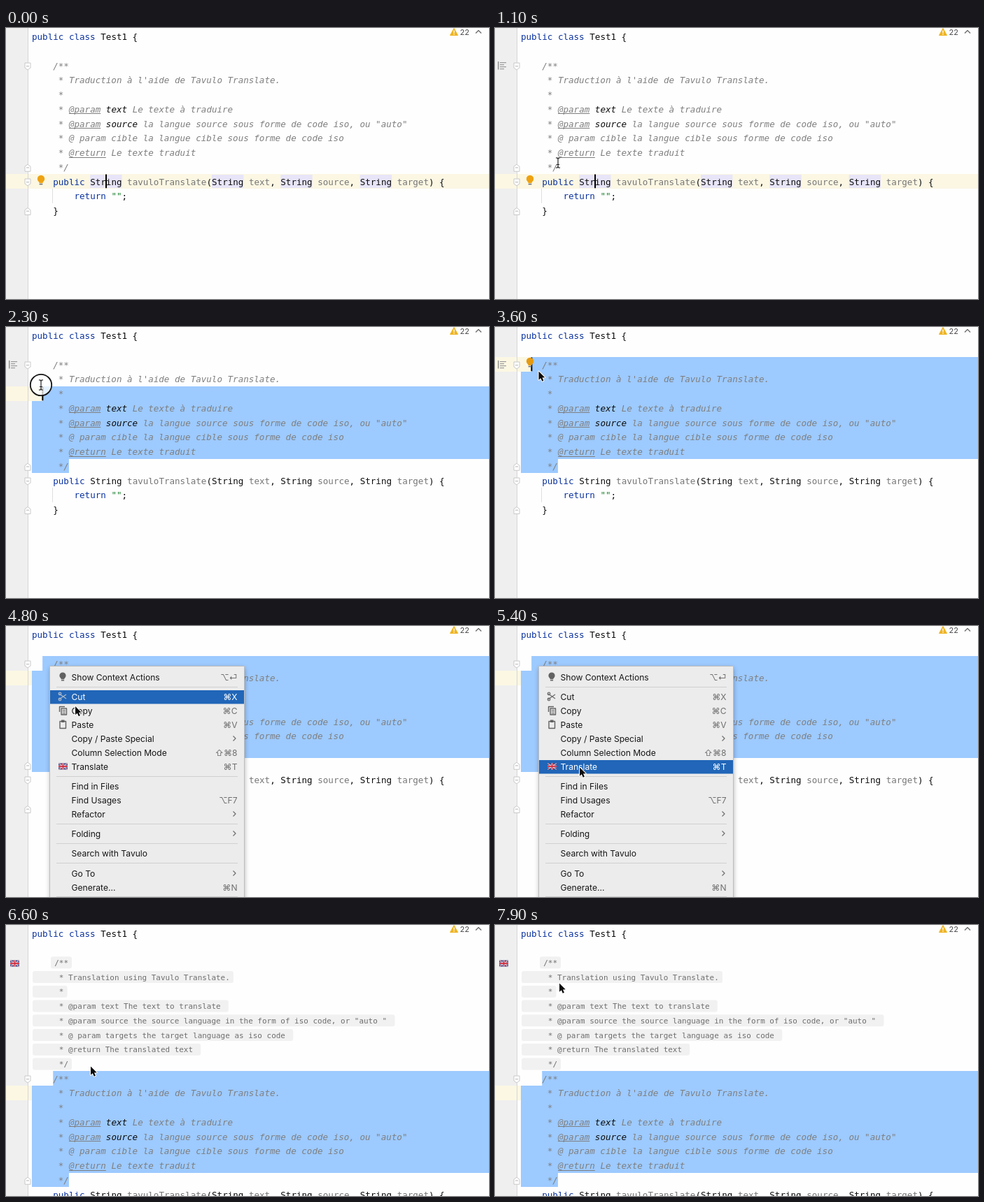
Animation, 690 px wide and 388 px high, one loop 8000 ms. Source, as an HTML page with a canvas:

```html
<!DOCTYPE html>
<html lang="fr">
<head>
<meta charset="utf-8">
<title>Editor translation</title>
<style>
html, body { margin: 0; width: 100%; height: 100%; overflow: hidden; background: #fefefe; }
canvas { display: block; width: 690px; height: 388px; }
</style>
</head>
<body>
<canvas id="stage"></canvas>
<script>
const W = 690, H = 388, LOOP = 8000, PITCH = 7.56, ROW = 20.75, LEFT = 37;
const MONO = '"DejaVu Sans Mono", "Noto Sans Mono", monospace';
const SANS = 'Inter, "DejaVu Sans", sans-serif';
const CODE = '12.557px ' + MONO, INLAY = '10.96px ' + MONO, MENU = '12.1px ' + SANS;
const GRAY = '#7f7f7f', UNUSED = '#767676', INK = '#0c0c0c', KEY = '#0a319f';
const BLUE = '#9dcaff', YELLOW = '#fbf7e3';

const canvas = document.getElementById('stage');
const ctx = canvas.getContext('2d');
const dpr = window.devicePixelRatio || 1;
canvas.width = W * dpr;
canvas.height = H * dpr;

const colX = c => LEFT + c * PITCH;
const rowMid = r => 12.7 + r * ROW;
const rowTop = r => Math.round(rowMid(r) - ROW / 2 - 0.5);

function rect(x, y, w, h, fill) {
  ctx.fillStyle = fill;
  ctx.fillRect(x, y, w, h);
}

function round(x, y, w, h, r, fill) {
  ctx.beginPath();
  ctx.roundRect(x, y, w, h, r);
  ctx.fillStyle = fill;
  ctx.fill();
}

function disc(x, y, r, fill) {
  ctx.beginPath();
  ctx.arc(x, y, r, 0, 7);
  ctx.fillStyle = fill;
  ctx.fill();
}

function trace(points, close) {
  ctx.beginPath();
  for (let i = 0; i < points.length; i += 2) ctx.lineTo(points[i], points[i + 1]);
  if (close) ctx.closePath();
}

function line(points, color, width = 1, close = false) {
  trace(points, close);
  ctx.strokeStyle = color;
  ctx.lineWidth = width;
  ctx.stroke();
}

function text(s, x, y, font, color, align = 'left') {
  ctx.font = font;
  ctx.fillStyle = color;
  ctx.textAlign = align;
  ctx.fillText(s, x, y);
}

// Each piece is a style letter followed by its text.
const STYLES = {
  k: ['', KEY], b: ['', INK], u: ['', UNUSED], s: ['', '#16802a'],
  c: ['italic ', GRAY], t: ['italic ', GRAY], p: ['italic ', INK]
};
function codeLine(row, col, pieces) {
  const y = rowMid(row) + 4.4;
  for (const piece of pieces) {
    const s = piece.slice(1), [slant, color] = STYLES[piece[0]];
    text(s, colX(col), y, slant + CODE, color);
    if (piece[0] === 't') rect(colX(col), Math.round(y + 1.5), s.length * PITCH, 1, GRAY);
    col += s.length;
  }
}

const DOC = [
  ['c/**'],
  ["c * Traduction à l'aide de Tavulo Translate."],
  ['c *'],
  ['c * ', 't@param', 'p text', 'c Le texte à traduire'],
  ['c * ', 't@param', 'p source', 'c la langue source sous forme de code iso, ou "auto"'],
  ['c * @ param cible la langue cible sous forme de code iso'],
  ['c * ', 't@return', 'c Le texte traduit'],
  ['c */']
].map(pieces => pieces.map((p, i) => i && pieces[i - 1][0] === 't' ? p[0] + ' ' + p.slice(1).trim() : p));
const ENGLISH = [
  '/**', '* Translation using Tavulo Translate.', '*',
  '* @param text The text to translate',
  '* @param source the source language in the form of iso code, or "auto "',
  '* @ param targets the target language as iso code',
  '* @return The translated text', '*/'
];

function drawCode(shift) {
  codeLine(0, 0, ['kpublic class ', 'bTest1 {']);
  DOC.forEach((d, i) => codeLine(2 + i + shift, 4, d));
  codeLine(10 + shift, 4, ['kpublic ', 'bString ', 'utavuloTranslate', 'b(String ', 'utext',
    'b, String ', 'usource', 'b, String ', 'utarget', 'b) {']);
  if (shift) return;
  rect(66, rowTop(11), 1, ROW, '#dedede');
  codeLine(11, 8, ['kreturn ', 's""', 'b;']);
  codeLine(12, 4, ['b}']);
}

function drawInlay() {
  ENGLISH.forEach((s, i) => {
    const y = rowMid(2 + i), x = i ? 75.8 : 69.2, left = i ? 38 : 64;
    const end = x + s.length * 6.6 + (s.includes('@') ? 11 : 5);
    round(left, y - 9, end - left, 17, 3, '#f1f1f1');
    text(s, x, y + 3.6, INLAY, '#6e6e6e');
  });
}

function drawFold(row, up) {
  const y = rowMid(row) + 0.8, d = up ? -1 : 1;
  const shape = [27, y - 5 * d, 35, y - 5 * d, 35, y + 2 * d, 31, y + 5 * d, 27, y + 2 * d];
  trace(shape, true);
  ctx.fillStyle = '#fff';
  ctx.fill();
  line(shape, '#c8c8c8', 1, true);
  rect(29, y - 0.8, 4, 1, '#b4b4b4');
}

function drawBulb(x, y, color, r) {
  disc(x, y, r, color);
  rect(x - r * 0.5, y + r * 0.7, r, r * 0.45, color);
  rect(x - r * 0.45, y + r * 1.3, r * 0.9, 1.6, '#6e6e6e');
}

function drawFlag(x, y) {
  ctx.save();
  ctx.beginPath();
  ctx.rect(x - 6.5, y - 4.5, 13, 9);
  ctx.clip();
  rect(x - 7, y - 5, 14, 10, '#22377f');
  for (const [color, wide] of [['#e8e8f0', 1.5], ['#cf2a3c', 0.6]]) {
    line([x - 7, y - 5, x + 7, y + 5], color, wide);
    line([x - 7, y + 5, x + 7, y - 5], color, wide);
  }
  rect(x - 1.5, y - 5, 3, 10, '#f4f4f8');
  rect(x - 7, y - 1.5, 14, 3, '#f4f4f8');
  rect(x - 0.9, y - 5, 1.8, 10, '#cf2a3c');
  rect(x - 7, y - 0.9, 14, 1.8, '#cf2a3c');
  ctx.restore();
}

function drawStatus() {
  trace([640, 0.5, 645.5, 10.5, 634.5, 10.5], true);
  ctx.fillStyle = ctx.strokeStyle = '#eeb422';
  ctx.lineJoin = 'round';
  ctx.lineWidth = 1;
  ctx.fill();
  ctx.stroke();
  rect(639.3, 3.5, 1.4, 3.8, '#fff');
  rect(639.3, 8.2, 1.4, 1.4, '#fff');
  text('22', 648.5, 9.8, '11px ' + SANS, '#4a4a4a');
  line([671, 7.5, 675, 3.5, 679, 7.5], '#6a6a6a', 1.3);
}

const ITEMS = [
  [73, 'Show Context Actions', '⌥⏎'],
  [101, 'Cut', '⌘X'], [121, 'Copy', '⌘C'], [141, 'Paste', '⌘V'],
  [161, 'Copy / Paste Special', '>'], [181, 'Column Selection Mode', '⇧⌘8'], [201, 'Translate', '⌘T'],
  [229, 'Find in Files', ''], [249, 'Find Usages', '⌥F7'], [269, 'Refactor', '>'],
  [297, 'Folding', '>'], [325.5, 'Search with Tavulo', ''],
  [354, 'Go To', '>'], [374, 'Generate...', '⌘N']
];

function drawMenuIcons(cutColor) {
  const c = '#626262';
  drawBulb(81, 71, c, 4.6);
  line([76, 97, 86, 104], cutColor, 1.3);
  line([76, 105, 86, 98], cutColor, 1.3);
  for (const y of [97, 105]) {
    ctx.beginPath();
    ctx.arc(77, y, 1.8, 0, 7);
    ctx.stroke();
  }
  line([76.5, 123, 76.5, 115.5, 84, 115.5], c, 1.4);
  line([79, 118, 86.5, 118, 86.5, 127, 79, 127], c, 1.4, true);
  rect(80.5, 120, 4.5, 1, c);
  rect(80.5, 122.3, 4.5, 1, c);
  rect(80.5, 124.6, 4.5, 1, c);
  line([77, 136.5, 85.5, 136.5, 85.5, 146.5, 77, 146.5], c, 1.4, true);
  rect(79, 134.5, 4.5, 3.5, c);
  drawFlag(81.5, 201);
}

function drawMenu(alpha, hot) {
  ctx.save();
  ctx.globalAlpha = alpha;
  ctx.shadowColor = 'rgba(0,0,0,.35)';
  ctx.shadowBlur = 7 * dpr;
  ctx.shadowOffsetY = 2 * dpr;
  rect(62.5, 57.5, 278, 345, '#ececec');
  ctx.shadowColor = 'transparent';
  line([62.5, 57.5, 340.5, 57.5, 340.5, 400, 62.5, 400], '#bdbdbd', 1, true);
  for (const y of [87, 215, 283, 311, 339.5, 387.5]) rect(72, Math.floor(y), 259, 1, '#d0d0d0');
  for (const [y, label, hint] of ITEMS) {
    const on = hot === label, tint = on ? '#fff' : '#6f6f6f';
    if (on) rect(63, y - 9, 277, 19.5, '#2166b8');
    text(label, 93.5, y + 4.6, MENU, on ? '#fff' : '#161616');
    if (hint === '>') line([324.5, y - 3.5, 328, y, 324.5, y + 3.5], tint, 1.2);
    else text(hint, 330.5, y + 4.6, MENU, tint, 'right');
  }
  drawMenuIcons(hot === 'Cut' ? '#a9b8ca' : '#6e6e6e');
  ctx.restore();
}

// Pointer stops: time, x, y.
const PATH = [
  [200, 265, 252], [600, 170, 203], [1000, 90, 193], [1100, 90, 193], [1300, 89, 200],
  [1400, 88, 199], [1700, 51, 157], [1800, 51, 157], [1900, 50, 135], [2500, 50, 57],
  [2700, 50, 56], [3000, 62.5, 63.5], [4700, 62.5, 63.5], [4800, 99, 115], [5000, 106, 142],
  [5400, 121, 202.5], [7500, 121, 202.5], [7600, 108, 234], [7700, 64, 196],
  [7800, 74, 122], [7900, 92, 83.5]
];
function pointer(t) {
  const i = PATH.findIndex(p => p[0] > t);
  if (i === 0) return PATH[0].slice(1);
  if (i < 0) return PATH[PATH.length - 1].slice(1);
  const a = PATH[i - 1], b = PATH[i], k = (t - a[0]) / (b[0] - a[0]);
  return [a[1] + (b[1] - a[1]) * k, a[2] + (b[2] - a[2]) * k];
}

function drawArrow(x, y) {
  ctx.save();
  ctx.translate(x, y);
  trace([0, 0, 0, 12.2, 2.8, 9.7, 4.8, 14.2, 6.9, 13.3, 5, 8.9, 8.7, 8.7], true);
  ctx.lineJoin = 'round';
  ctx.lineWidth = 2;
  ctx.strokeStyle = '#fff';
  ctx.stroke();
  ctx.fillStyle = '#0a0a0a';
  ctx.fill();
  ctx.restore();
}

function drawBeam(x, y) {
  for (const [color, w] of [['rgba(255,255,255,.8)', 2.6], ['#222', 1.2]]) {
    line([x, y - 6, x, y + 6], color, w);
    line([x - 3, y - 7.2, x - 1, y - 7, x, y - 6, x + 1, y - 7, x + 3, y - 7.2], color, w);
    line([x - 3, y + 7.2, x - 1, y + 7, x, y + 6, x + 1, y + 7, x + 3, y + 7.2], color, w);
  }
  line([x - 2, y + 2.5, x + 2, y + 2.5], '#222', 1);
}

function drawPointer(t) {
  if (t < 200) return;
  const [x, y] = pointer(t);
  if (t >= 2900) return drawArrow(x, y);
  if (t >= 1300 && t < 2800) {
    disc(x, y, 15, 'rgba(255,255,255,.75)');
    ctx.beginPath();
    ctx.arc(x, y, 15.2, 0, 7);
    ctx.strokeStyle = '#151515';
    ctx.lineWidth = 1.8;
    ctx.stroke();
  }
  drawBeam(x, y);
}

// The caret trails the drag, which lasts from 1300 to 2700 ms.
function caretAt(t) {
  if (t < 1300) return [10, 14];
  const [x, y] = pointer(Math.min(2700, Math.max(t - 100, 1300)));
  const row = Math.floor((y - rowTop(0)) / ROW);
  return [row, Math.min(7, Math.max(2, Math.round((x - LEFT) / PITCH)))];
}

function drawSelection(from, x, to) {
  for (let r = from; r <= to; r++) {
    const left = r === from ? x : LEFT, right = r === to ? colX(7) : W;
    rect(left, rowTop(r), right - left, rowTop(r + 1) - rowTop(r), BLUE);
  }
}

function drawScene(t) {
  const done = t >= 6600, menuSeen = t >= 4100, shift = done ? 8 : 0;
  const [row, col] = caretAt(t);
  rect(0, 0, W, H, '#fefefe');
  rect(0, 0, 31, H, '#efefef');

  const bandRow = menuSeen ? 3 + shift : row;
  rect(0, rowTop(bandRow), menuSeen ? LEFT : W, rowTop(bandRow + 1) - rowTop(bandRow), YELLOW);
  rect(31, 0, 1, H, '#d6d6d6');

  if (t < 1300) {
    for (const c of [11, 34, 47, 62]) rect(colX(c), rowTop(10) + 1, 6 * PITCH, 19, '#e8e5f8');
  } else if (done) {
    drawSelection(10, colX(4), 17);
  } else {
    drawSelection(row, colX(col), 9);
  }

  if (done) drawInlay();
  drawCode(shift);
  drawFold(2 + shift, false);
  drawFold(9 + shift, true);
  if (done) {
    drawFlag(12.5, 55);
  } else {
    drawFold(10, false);
    drawFold(12, true);
  }

  if (t >= 400 && !menuSeen) {
    rect(4, 48, 1.4, 11.5, '#8d8d8d');
    [9, 6, 9, 6].forEach((w, i) => rect(7, 49 + i * 3, w, 1.2, '#9a9a9a'));
  }
  if (!menuSeen) rect(colX(col) - 0.8, rowTop(row) + 0.5, 2, ROW - 1, '#000');
  if (t < 1300) drawBulb(50, 216, '#eea211', 5.2);
  if (t >= 3600 && !menuSeen) drawBulb(50, 49, '#e59a12', 5.2);
  drawStatus();

  if (t >= 4200 && t < 6500) {
    const hit = pointer(t - 30)[1];
    const item = t >= 4800 && ITEMS.find(i => Math.abs(i[0] - hit) <= 10);
    const blink = t === 6000;
    drawMenu(t === 4200 ? 0.85 : t === 6400 ? 0.4 : 1, item && !blink ? item[1] : '');
  }
  drawPointer(t);
}

function frame(now) {
  ctx.setTransform(dpr, 0, 0, dpr, 0, 0);
  drawScene(Math.floor((now % LOOP) / 100) * 100);
  requestAnimationFrame(frame);
}
frame(0);
</script>
</body>
</html>
```
